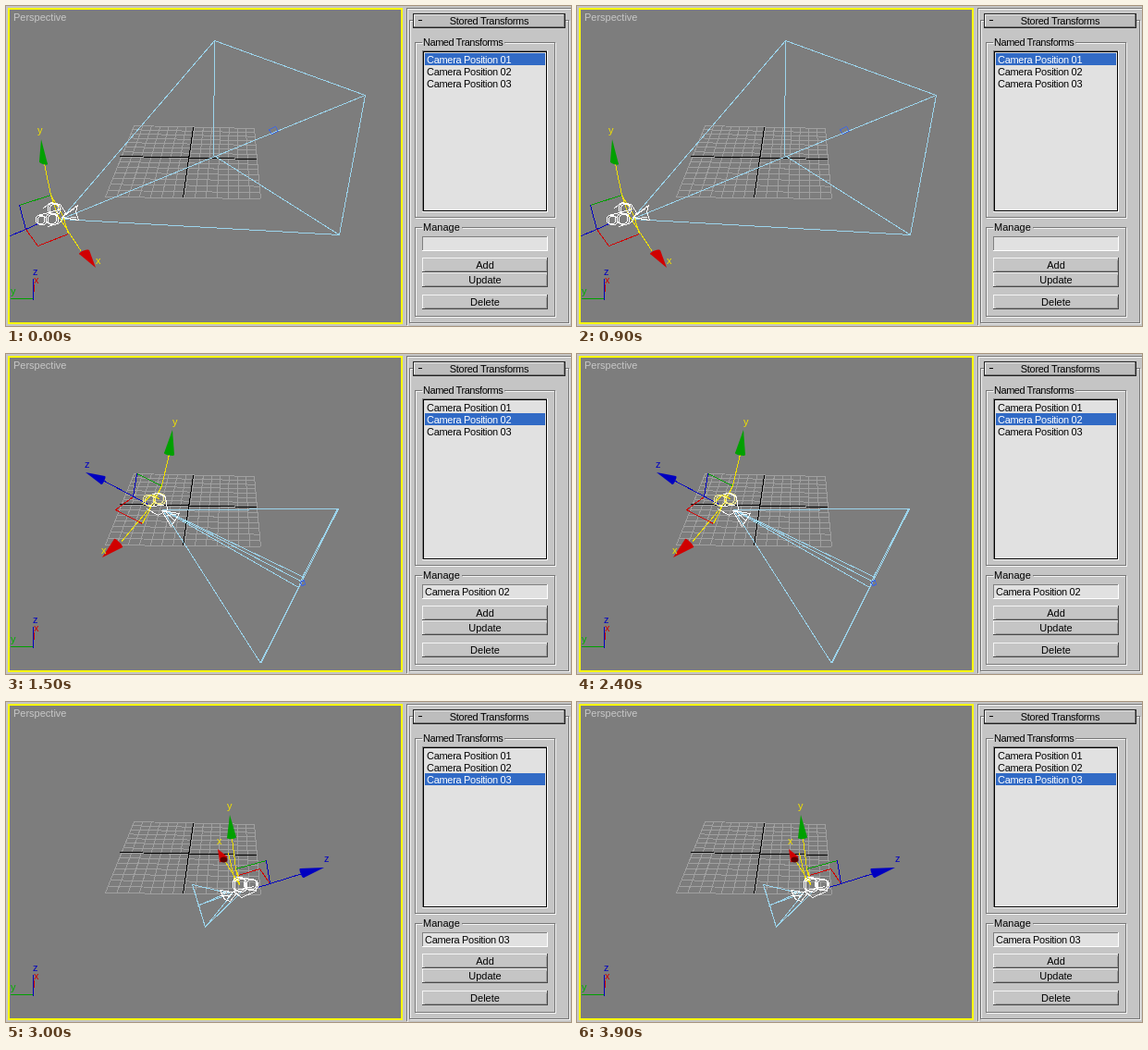
These frames come from a looping animation (611x346 px, 4.5 s). An HTML page:

```html
<!DOCTYPE html>
<html lang="en">
<head>
<meta charset="utf-8">
<title>Stored Transforms</title>
<style>
html, body { margin: 0; width: 100%; height: 100%; overflow: hidden; background: #c5c5c5; }
svg { display: block; width: 611px; height: 346px; }
text { font: 11px "Liberation Sans", Arial, sans-serif; fill: #000; white-space: pre; }
.tight { letter-spacing: -.3px; }
.tighter { letter-spacing: -.45px; }
.mid { text-anchor: middle; }
</style>
</head>
<body>
<svg id="stage" viewBox="0 0 611 346" xmlns="http://www.w3.org/2000/svg"></svg>
<script>
const NS = 'http://www.w3.org/2000/svg';
const stage = document.getElementById('stage');
const HOLD = 1500;
const C = {
  y: '#f0e000', x: '#d00000', g: '#00a000', z: '#0000c0',
  sky: '#9cd4ec', white: '#fff', pale: '#f4ec90', panel: '#c5c5c5', list: '#e1e1e1'
};

function add(parent, tag, attrs, label) {
  const el = document.createElementNS(NS, tag);
  for (const k in attrs) el.setAttribute(k, attrs[k]);
  if (label !== undefined) el.textContent = label;
  parent.appendChild(el);
  return el;
}
const group = () => add(stage, 'g', {});
const rect = (p, x, y, w, h, fill) =>
  add(p, 'rect', { x, y, width: w, height: h, fill, 'shape-rendering': 'crispEdges' });
const path = (p, d, stroke, shift = .5) =>
  add(p, 'path', { d, stroke, fill: 'none', 'shape-rendering': 'crispEdges',
    transform: `translate(${shift} ${shift})` });
const text = (p, x, y, s, cls = '', fill = '#000') =>
  add(p, 'text', { x, y, class: cls, style: 'fill:' + fill }, s);

function bevel(p, x, y, w, h, fill, light, shade) {
  rect(p, x, y, w, h, shade);
  rect(p, x, y, w - 1, h - 1, light);
  rect(p, x + 1, y + 1, w - 2, h - 2, fill);
}

function etch(p, d) {
  path(p, d, '#f4f4f4', 1.5);
  path(p, d, '#777');
}

// Maps the unit square onto four corners in perspective
function projector([[x0, y0], [x1, y1], [x2, y2], [x3, y3]]) {
  const ax = x1 - x2, bx = x3 - x2, sx = x0 - x1 + x2 - x3;
  const ay = y1 - y2, by = y3 - y2, sy = y0 - y1 + y2 - y3;
  const den = ax * by - bx * ay;
  const g = (sx * by - bx * sy) / den, h = (ax * sy - sx * ay) / den;
  return (u, v) => {
    const w = g * u + h * v + 1;
    const x = (x0 + (x1 - x0 + g * x1) * u + (x3 - x0 + h * x3) * v) / w;
    const y = (y0 + (y1 - y0 + g * y1) * u + (y3 - y0 + h * y3) * v) / w;
    return x.toFixed(1) + ' ' + y.toFixed(1);
  };
}

function drawViewport() {
  const p = group();
  rect(p, 2, 2, 427, 342, '#ffff00');
  rect(p, 4, 4, 423, 338, '#7d7d7d');
  text(p, 8, 16, 'Perspective', '', '#c8c8c8');

  const at = projector([[138, 129], [268, 132], [275, 208], [107, 206]]);
  const N = 14;
  let d = '';
  for (let i = 0; i <= N; i++) {
    const t = i / N;
    d += `M${at(0, t)}L${at(1, t)}M${at(t, 0)}L${at(t, 1)}`;
  }
  path(p, d, '#a0a0a0');
  path(p, 'M123 162L271 165M202 131L191 207', '#000');

  path(p, 'M4 316H29', C.g);
  path(p, 'M30 301L29 316', C.x);
  path(p, 'M29 294V317', C.z);
  text(p, 5, 312, 'y', '', '#00b000');
  text(p, 29, 291, 'z', '', C.z);
  text(p, 30, 300, 'x', '', C.x);
}

function groupBox(p, y, h, label, gap, cls) {
  etch(p, `M449 ${y}H442V${y + h}H593V${y}H${450 + gap}`);
  text(p, 451, y + 4, label, cls);
}

function drawPanel() {
  const p = group();
  etch(p, 'M611 2H433V344');
  etch(p, 'M440 15H436V342H608V15H604');
  rect(p, 440, 8, 165, 16, '#222');
  bevel(p, 441, 9, 163, 14, '#bdbdbd', '#eee', '#777');
  rect(p, 446, 15, 4, 1, '#000');
  text(p, 522.5, 20, 'Stored Transforms', 'mid tight');
  groupBox(p, 39, 189, 'Named Transforms', 88, 'tighter');
  groupBox(p, 239, 96, 'Manage', 42);

  bevel(p, 450, 48, 136, 175, C.list, '#808080', '#fff');
  bevel(p, 451, 49, 134, 173, C.list, '#000', '#000');
  bevel(p, 450, 249, 136, 16, C.list, '#808080', '#fff');
  [['Add', 272], ['Update', 288], ['Delete', 312]].forEach(([s, y]) => {
    bevel(p, 450, y, 136, 16, C.panel, '#f4f4f4', '#4a4a4a');
    path(p, `M452 ${y + 14}H584V${y + 2}`, '#999');
    text(p, 518, y + 12, s, 'mid');
  });
}

const names = [1, 2, 3].map(n => 'Camera Position 0' + n);

function addCone(p, base1, base2, tip, fill) {
  add(p, 'path', { d: `M${base1}L${tip}L${base2}Z`, fill });
  const [a, b] = base1.split(' ').map(Number), [c, e] = base2.split(' ').map(Number);
  const tilt = Math.atan2(e - b, c - a) * 180 / Math.PI;
  const cx = (a + c) / 2, cy = (b + e) / 2;
  add(p, 'ellipse', { cx, cy, rx: Math.hypot(c - a, e - b) / 2, ry: 1.5, fill,
    transform: `rotate(${tilt} ${cx} ${cy})` });
}

function reel(p, cx, cy, rx, ry, stroke) {
  for (const shift of [0, 2])
    add(p, 'ellipse', { cx: cx + shift, cy: cy + shift / 2, rx, ry, fill: 'none',
      stroke, 'shape-rendering': 'crispEdges' });
}

// Each pose: coloured lines, arrow heads, axis labels, camera body
const poses = [
  {
    lines: [
      ['sky', 'M225 37L388 96L360 247L224 161ZM225 37L59 230L388 96M59 230L360 247'],
      ['g', 'M14 215L48 204'],
      ['z', 'M14 215L21 241M4 248L21 241L34 235'],
      ['x', 'M21 241L34 259L67 246'],
      ['y', 'M41 170L48 204L55 225L81 265M48 204L61 226L67 246']
    ],
    target: 'M284 133l7 -3l3 5l-7 3Z',
    cones: [['g', '36 168', '45 171', '38 144'], ['x', '79 268', '90 264', '97 283']],
    labels: [['y', 34, 138, 'y'], ['x', 97, 279, 'y']],
    tint: 'white',
    reels: [[37, 231, 5, 5], [51, 219, 6, 6], [49, 230, 6, 6]],
    body: 'M40 218L48 212L58 214L64 223L58 234L45 238M34 226L60 219M60 228L77 215L75 222L78 231ZM63 226L74 218M64 229L76 228'
  },
  {
    lines: [
      ['sky', 'M359 167L169 168L275 334M322 241L170 168L320 246M171 169L316 252M359 167L275 334M358 167L320 241L316 252L275 333'],
      ['g', 'M141 129L168 142'],
      ['z', 'M141 129L137 154M106 137L138 154L153 162'],
      ['x', 'M137 154L118 168L147 183'],
      ['y', 'M176 108L168 142L158 162L124 203M168 142L147 183M147 161L158 151L166 157']
    ],
    target: 'M318 246l4 -2l1 5l-4 1Z',
    cones: [['g', '171 107', '182 109', '180 82'], ['z', '107 132', '103 141', '86 128'],
      ['x', '117 200', '126 209', '104 220']],
    labels: [['y', 180, 77, 'y'], ['z', 85, 123, 'z'], ['x', 103, 216, 'y']],
    tint: 'pale',
    reels: [[154, 158, 6, 6], [165, 156, 6, 6]],
    body: 'M158 151L164 150L172 154L174 168L164 174L152 167M155 164L171 163M168 169L187 172L178 186ZM172 170L182 180M174 174L187 172'
  },
  {
    lines: [
      ['sky', 'M201 197L215 243L253 206M201 197L244 207L215 243M201 197L208 219L215 243M208 219L240 208M207 220L238 206'],
      ['g', 'M248 180L281 171'],
      ['z', 'M281 171L285 196M320 185L285 196L272 200'],
      ['x', 'M251 187L274 180L285 196'],
      ['y', 'M244 147L248 180L252 197L236 171M240 163L247 193M248 180L251 188']
    ],
    cones: [['g', '239 147', '249 146', '242 122'], ['z', '318 180', '322 190', '344 179'],
      ['x', '231 173', '239 167', '229 159']],
    shade: { cx: 235.5, cy: 170.5, rx: 4, ry: 3, fill: '#600000' },
    labels: [['y', 239, 116, 'y'], ['x', 228, 154, 'y'], ['z', 344, 173, 'z']],
    tint: 'white',
    reels: [[252, 197, 7, 8], [264, 197, 7, 6]],
    body: 'M246 193L259 190L271 193L270 204L254 211L246 204M248 203L268 199M231 203L249 206L242 215L236 213ZM234 206L251 204M238 213L246 204M230 209L241 209'
  }
];

function drawPose(pose, i) {
  const p = group();
  for (const [c, d] of pose.lines) path(p, d, C[c]);
  if (pose.target) path(p, pose.target, '#4468d8');
  for (const [c, a, b, tip] of pose.cones) addCone(p, a, b, tip, C[c]);
  if (pose.shade) add(p, 'ellipse', pose.shade);
  for (const r of pose.reels) reel(p, ...r, C[pose.tint]);
  path(p, pose.body, C.white);
  for (const [s, x, y, c] of pose.labels) text(p, x, y, s, '', C[c]);

  rect(p, 453, 51 + 13 * i, 130, 13, '#316ac5');
  names.forEach((s, n) => text(p, 455, 62 + 13 * n, s, 'tight', n === i ? '#fff' : '#000'));
  if (i) text(p, 453, 261, names[i], 'tight');
  return p;
}

drawViewport();
drawPanel();
const views = poses.map(drawPose);

function show(time) {
  const now = Math.floor(time / HOLD) % views.length;
  views.forEach((v, i) => v.setAttribute('visibility', i === now ? 'visible' : 'hidden'));
}

const start = performance.now();
function tick() {
  show(performance.now() - start);
  requestAnimationFrame(tick);
}
tick();
</script>
</body>
</html>
```
